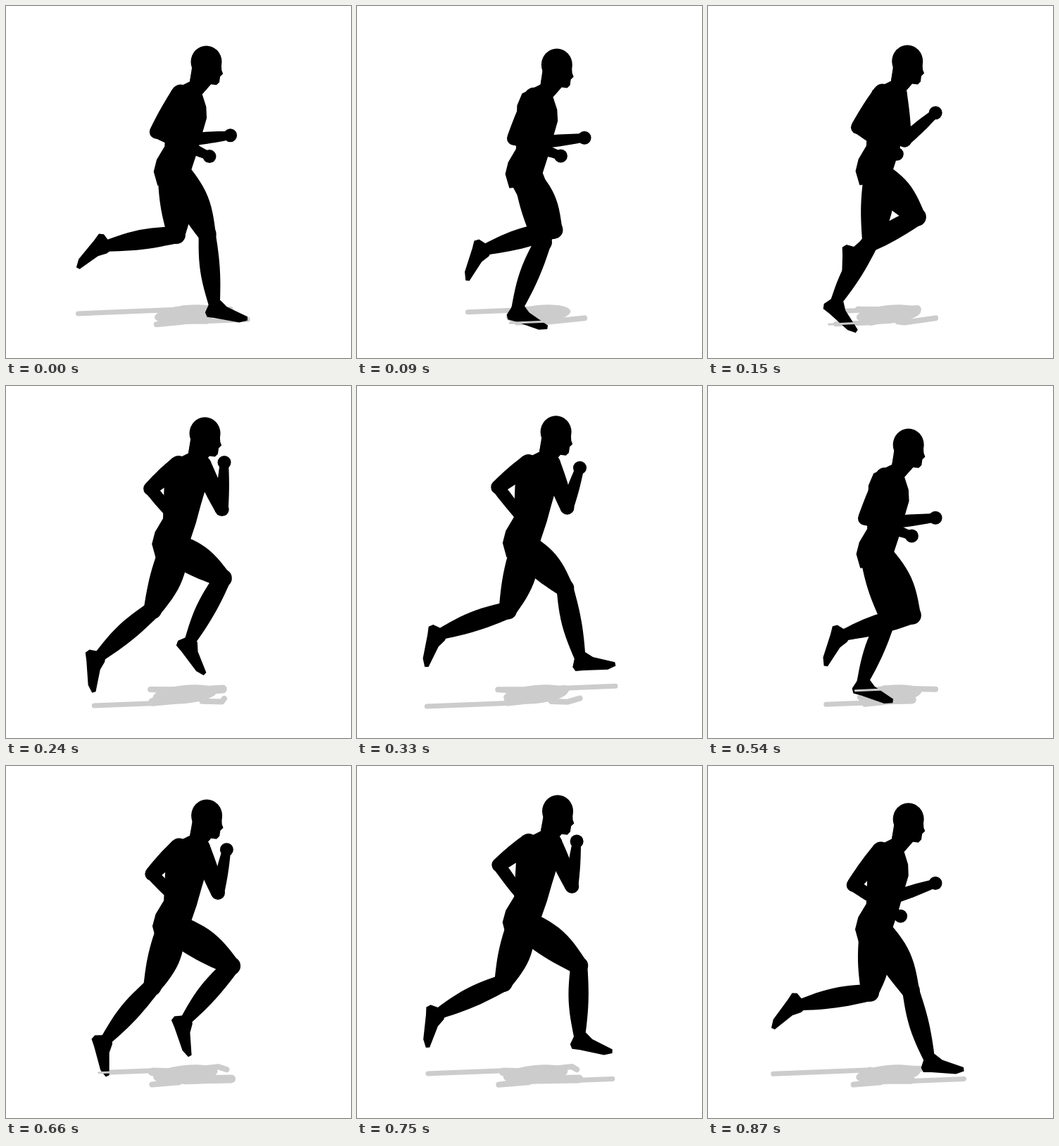
An HTML page with a canvas that plays this animation: 490 px wide and 500 px high, repeating every 900 ms.

```html
<!DOCTYPE html>
<html lang="en">
<head>
<meta charset="utf-8">
<title>Runner</title>
<style>
html, body { margin: 0; width: 100%; height: 100%; overflow: hidden; background: #fff; }
canvas { display: block; }
</style>
</head>
<body>
<canvas id="stage" width="490" height="500"></canvas>
<script>
const ctx = document.getElementById('stage').getContext('2d');
const LOOP = 900, STEP = 30, TURN = Math.PI * 2;

// Periodic curve: a mean plus cosine and sine weights for each harmonic
const wave = (mean, ...terms) => phase =>
  terms.reduce((sum, [a, b], i) => {
    const w = (i + 1) * phase;
    return sum + a * Math.cos(w) + b * Math.sin(w);
  }, mean);

// One stride; both sides share it, half a turn apart. Angles in degrees from straight down.
const stride = {
  thigh: wave(17.3, [11, -35], [-2.1, 3], [.7, 3.7], [0, 2.2]),
  shin: wave(-38.2, [44.8, -10.1], [.9, -9.3], [-1.4, -4.7], [-.3, -1.9]),
  foot: wave(14.8, [62, -10.1], [1, -6.9], [-2.5, -.8], [-7.3, .6]),
  elbowX: wave(244, [-18.9, 49.1], [-11.3, -4.2]),
  elbowY: wave(178, [-6, 14.1], [5.3, 6.4]),
  handX: wave(292, [-12.6, 36.4], [11.8, 11.1], [-2.2, 5.2]),
  handY: wave(181, [14.9, -42.4], [16.3, 8.8])
};

const FOOT = [[-7, -9], [6, -9], [18, -4], [50, -2], [52, 3], [42, 10], [8, 17], [-3, 20], [-8, 15]];
const FACE = [[263, 84], [304, 78], [305, 90], [307, 95], [303, 99], [302, 107], [298, 111], [290, 110], [278, 124], [260, 106]];
const TORSO = [
  [262, 95], [290, 110], [278, 124], [284, 142], [285, 158], [279, 180], [273, 204], [264, 233],
  [254, 246], [236, 252], [217, 254], [211, 234], [215, 217], [226, 198], [227, 136], [234, 119], [260, 106]
];

function path(points) {
  ctx.beginPath();
  points.forEach(([x, y]) => ctx.lineTo(x, y));
}

function fill(points) {
  path(points);
  ctx.fill();
}

function oval(x, y, rx, ry = rx, tilt = 0) {
  ctx.beginPath();
  ctx.ellipse(x, y, rx, ry, tilt, 0, TURN);
  ctx.fill();
}

function swing([x, y], length, degrees) {
  const a = degrees * Math.PI / 180;
  return [x + length * Math.sin(a), y + length * Math.cos(a)];
}

function bone(a, b) {
  const dx = b[0] - a[0], dy = b[1] - a[1], len = Math.hypot(dx, dy);
  return { len, put: (u, v) => [a[0] + (u * dx - v * dy) / len, a[1] + (u * dy + v * dx) / len] };
}

// Tapered limb with rounded ends and a muscle bulge on either side
function limb(a, b, from, to, back, front) {
  const { len, put } = bone(a, b);
  const side = (sign, bulge) => Array.from({ length: 13 }, (_, i) => {
    const t = i / 12;
    return put(t * len, sign * (from + (to - from) * t + bulge * Math.sin(Math.PI * t)));
  });
  fill([...side(1, back), ...side(-1, front).reverse()]);
  oval(...a, from);
  oval(...b, to);
}

const floorY = (x, z) => 450 - .04 * x + 9 * z;
const onFloor = (x, z) => [x, floorY(x, z)];

function shade(points, width) {
  path(points);
  ctx.lineWidth = width;
  ctx.stroke();
}

function makeSide(phase, z, hip, bob) {
  const s = {};
  for (const part in stride) s[part] = stride[part](phase);
  const top = z > 0 ? [hip[0] + 6, hip[1]] : hip;
  const knee = swing(top, z > 0 ? 95 : 86, s.thigh);
  const ankle = swing(knee, 101, s.shin);
  return {
    z, top, knee, ankle,
    toe: swing(ankle, 51, s.foot),
    shoulder: [245 + (s.elbowX - 205) * .33, 123 + bob],
    elbow: [s.elbowX, s.elbowY + bob],
    hand: [s.handX, s.handY + bob]
  };
}

function drawShadow({ z, top, knee, ankle, toe, shoulder, elbow, hand }) {
  shade([onFloor(top[0], z * .6), onFloor(knee[0], z * .8)], 12);
  shade([onFloor(knee[0], z), onFloor(ankle[0], z), onFloor(toe[0], z)], 7);
  const arm = [onFloor(shoulder[0], z), onFloor(elbow[0], z * 1.2), onFloor(hand[0], z * .7)];
  fill(arm);
  shade(arm, 8);
}

function drawSide({ top, knee, ankle, toe, shoulder, elbow, hand }) {
  limb(top, knee, 21, 13, 3, 8);
  limb(knee, ankle, 12, 8, 5, 3);
  const { put } = bone(ankle, toe);
  fill(FOOT.map(([u, v]) => put(u, v)));
  limb(shoulder, elbow, 13, 10, 1, 1);
  limb(elbow, hand, 9, 6, 1, 1);
  oval(...hand, 9.5);
}

function draw(t) {
  const phase = t / LOOP * TURN;
  const bounce = Math.cos(2 * (phase - .5));
  const bob = 10 * bounce - 4;
  const headX = 1.5 + 1.5 * Math.cos(phase - 5), hipX = 2 * bounce - 2.4;
  const hip = [238 + hipX, 238 + bob * .85];
  const sides = [makeSide(phase + Math.PI, -1, hip, bob), makeSide(phase, 1, hip, bob)];
  const lean = ([x, y]) => {
    const k = (y - 55) / 180;
    return [x + headX + (hipX - headX) * k, y + bob * (1 - .15 * k)];
  };

  ctx.fillStyle = '#fff';
  ctx.fillRect(0, 0, 490, 500);

  ctx.fillStyle = ctx.strokeStyle = '#ccc';
  ctx.lineJoin = ctx.lineCap = 'round';
  oval(258 + hipX, 438, 46, 13, -.1);
  sides.forEach(drawShadow);

  ctx.fillStyle = '#000';
  oval(...lean([283, 78]), 22, 23);
  fill(FACE.map(lean));
  fill(TORSO.map(lean));
  sides.forEach(drawSide);

  // The floor shadow cuts across a foot that dips below it
  ctx.strokeStyle = '#ccc';
  sides.forEach(({ z, ankle, toe }) => {
    if (toe[1] > floorY(toe[0], z) + 5) {
      shade([onFloor(ankle[0] - 10, z), onFloor(toe[0] + 4, z)], 3);
    }
  });
}

function tick() {
  draw(Math.floor(performance.now() / STEP) * STEP % LOOP);
  requestAnimationFrame(tick);
}
tick();
</script>
</body>
</html>
```
